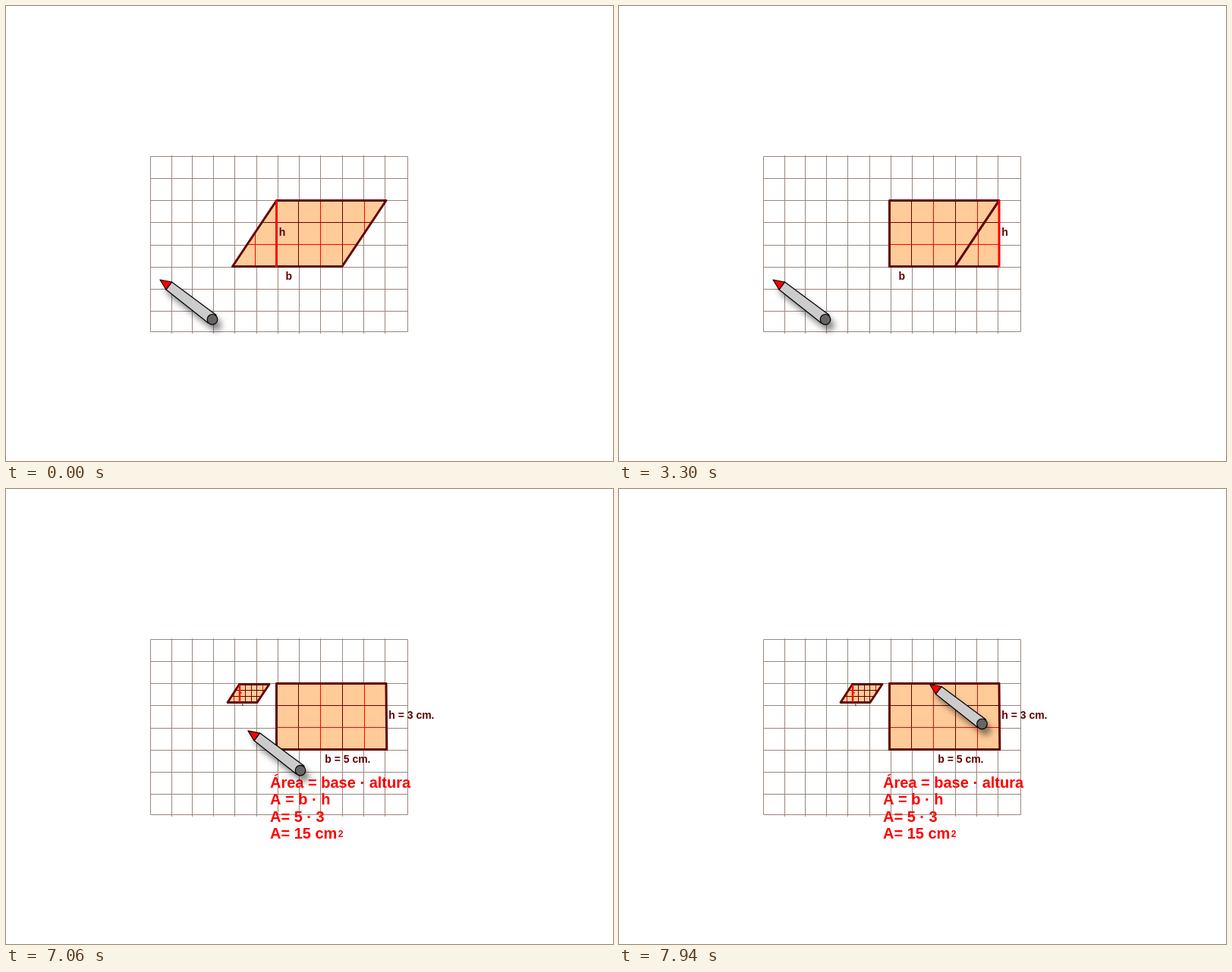
Recreate the animation shown at these times as an HTML page with a canvas. Size 800 px wide and 600 px high, loop 8 s.

```html
<!DOCTYPE html>
<html lang="es">
<head>
<meta charset="utf-8">
<title>Área del romboide</title>
<style>
html, body { margin: 0; width: 100%; height: 100%; overflow: hidden; background: #fff; }
canvas { display: block; }
</style>
</head>
<body>
<canvas id="stage" width="800" height="600"></canvas>
<script>
const ctx = document.getElementById('stage').getContext('2d');
const LOOP = 8000;
const DARK = '#600000', RED = '#ff0000', FILL = '#ffcc99', GRID = '#9a867c';

// Corners shared by the figures
const L = 356.5, R = 501, T = 256.5, B = 343.5, SLANT = 58;

const COLS = [218, 245, 273, 301, 330, 358, 386, 414, 443, 471, 499];
const ROWS = [227, 256, 285, 315, 344, 373, 402];

// Start time and shift of the cut triangle
const SHIFTS = [[0, 0], [500, 14], [1060, 45], [1620, 72], [2180, 105], [2740, 131], [3300, 144.5]];

function trace(points, close) {
  ctx.beginPath();
  points.forEach(([x, y], i) => i ? ctx.lineTo(x, y) : ctx.moveTo(x, y));
  if (close) ctx.closePath();
}

function line(points, color, width, close) {
  trace(points, close);
  ctx.strokeStyle = color;
  ctx.lineWidth = width;
  ctx.stroke();
}

function text(str, x, y, size, color) {
  ctx.font = `bold ${size}px "Liberation Sans", Arial, sans-serif`;
  ctx.fillStyle = color;
  ctx.fillText(str, x, y);
}

const vline = (x, y1, y2, color) => line([[x + .5, y1], [x + .5, y2]], color, 1);
const hline = (y, x1, x2, color) => line([[x1, y + .5], [x2, y + .5]], color, 1);

function sheet() {
  COLS.forEach(x => vline(x, 197, 432, GRID));
  ROWS.forEach(y => hline(y, 190, 530, GRID));
  ctx.strokeStyle = GRID;
  ctx.lineWidth = 1;
  ctx.strokeRect(190.5, 198.5, 339, 231);
}

// Filled polygon ruled in unit squares
function ruled(points, cols, rows) {
  const xs = points.map(p => p[0]), ys = points.map(p => p[1]);
  const x1 = Math.min(...xs), x2 = Math.max(...xs);
  const y1 = Math.min(...ys), y2 = Math.max(...ys);
  ctx.save();
  trace(points, true);
  ctx.fillStyle = FILL;
  ctx.fill();
  ctx.clip();
  cols.forEach(([x, color]) => vline(x, y1, y2, color));
  rows.forEach(([y, color]) => hline(y, x1, x2, color));
  ctx.restore();
}

const bigCols = [[385, DARK], [414, RED], [443, DARK], [472, RED]];
const bigRows = [[285, DARK], [314, RED]];

function trapezoid() {
  const shape = [[L, T], [R, T], [R - SLANT, B], [L, B]];
  ruled(shape, bigCols, bigRows);
  line(shape, DARK, 3, true);
}

function triangle(dx) {
  const x = L + dx, left = x - SLANT;
  ruled([[left, B], [x, T], [x, B]], [[Math.round(328 + dx), RED]], bigRows);
  line([[x, T], [left, B], [x, B]], DARK, 3);
  line([[x, T], [x, B + 1]], RED, 3);
}

function rectangle() {
  const shape = [[L, T], [R, T], [R + .8, B], [L, B]];
  ruled(shape, bigCols, bigRows);
  line(shape, DARK, 3, true);
}

function miniature() {
  const shape = [[307.5, 257.5], [347, 257.5], [331, 281.5], [292, 281.5]];
  ruled(shape,
    [[300, RED], [315, DARK], [323, DARK], [330, DARK], [338, RED]],
    [[265, DARK], [273, DARK]]);
  line(shape, DARK, 2.8, true);
  line([[308, 258], [308, 281]], RED, 2.4);
  text('h', 308.8, 270, 3.8, RED);
  text('b', 310.8, 286, 3.8, DARK);
}

function formulas() {
  text('Área = base · altura', 348, 393.5, 20, RED);
  text('A = b · h', 348, 416, 20, RED);
  text('A= 5 · 3', 348, 438.5, 20, RED);
  text('A= 15 cm', 348, 460.5, 20, RED);
  text('2', 437.7, 459, 12, RED);
}

function penShift(t) {
  if (t < 6740) return [0, 0];
  const step = Math.floor((t - 6740) / 80);
  if (step <= 10) return [-2.4 + 29.6 * step, -1.3 - 10.22 * step];
  return [293.6 - 17.42 * (Math.min(step, 15) - 10), -103.5];
}

function pen([dx, dy]) {
  const tip = [[203, 361], [218.5, 364], [211, 374]];
  const body = [[218.5, 364], [277, 407.5], [266.5, 418], [211, 374]];
  const cap = () => {
    ctx.beginPath();
    ctx.arc(272, 413.3, 6.8, 0, Math.PI * 2);
  };
  ctx.save();
  ctx.translate(dx, dy);
  ctx.lineJoin = 'round';

  // One silhouette casts the shadow
  ctx.save();
  ctx.shadowColor = 'rgba(0,0,0,.5)';
  ctx.shadowOffsetX = 5;
  ctx.shadowOffsetY = 8;
  ctx.shadowBlur = 8;
  const outline = new Path2D();
  [tip[0], tip[1], body[1]].forEach(([x, y], i) => i ? outline.lineTo(x, y) : outline.moveTo(x, y));
  outline.arc(272, 413.3, 6.8, -.8, 2.4);
  outline.lineTo(...tip[2]);
  outline.closePath();
  ctx.fillStyle = '#cccccc';
  ctx.fill(outline);
  ctx.restore();

  for (const [shape, color] of [[body, '#cccccc'], [tip, RED]]) {
    trace(shape, true);
    ctx.fillStyle = color;
    ctx.fill();
    line(shape, '#000', 1.2, true);
  }
  cap();
  ctx.fillStyle = '#666666';
  ctx.fill();
  ctx.strokeStyle = '#000';
  ctx.lineWidth = 1.2;
  ctx.stroke();
  ctx.restore();
}

function draw(t) {
  ctx.fillStyle = '#fff';
  ctx.fillRect(0, 0, 800, 600);
  ctx.lineJoin = 'round';
  sheet();

  const dx = SHIFTS.filter(s => s[0] <= t).pop()[1];
  if (t < 3860) {
    trapezoid();
    triangle(dx);
  } else {
    rectangle();
  }

  const solved = t >= 4500;
  text(solved ? 'h = 3 cm.' : 'h', 359.7 + dx, 303, 14, DARK);
  text(solved ? 'b = 5 cm.' : 'b', solved ? 420.2 : 368.5, 361, 14, DARK);
  if (solved) {
    miniature();
    formulas();
  }
  pen(penShift(t));
}

const start = performance.now();
function tick(now) {
  draw(Math.max(0, now - start) % LOOP);
  requestAnimationFrame(tick);
}
draw(0);
requestAnimationFrame(tick);
</script>
</body>
</html>
```
